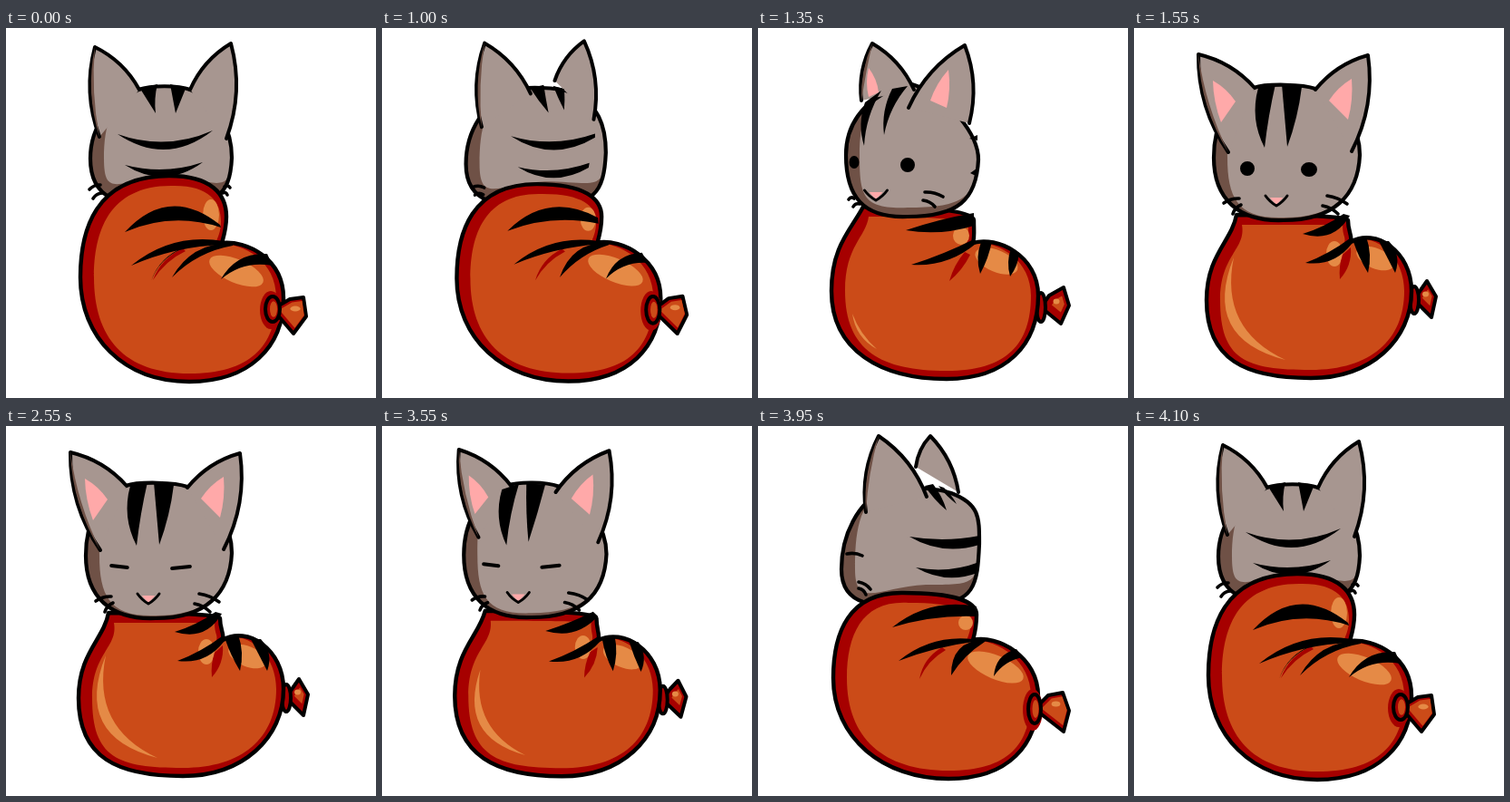
Write an HTML page that moves like this. It is 408 px wide and 408 px high and loops after 4600 ms.

```html
<!DOCTYPE html>
<html lang="en">
<head>
<meta charset="utf-8">
<title>Sausage cat</title>
<style>
html, body { margin: 0; width: 100%; height: 100%; overflow: hidden; background: #fff; }
svg { display: block; width: 100vw; height: 100vh; }
path { stroke-linejoin: round; stroke-linecap: round; }
</style>
</head>
<body>
<svg id="stage" viewBox="0 0 408 408"></svg>
<script>
const RED = '#a60000', ORANGE = '#cb4b18', GLOW = '#e58a46';
const FUR = '#a79690', SHADE = '#6f5146', PINK = '#ffa9a9', INK = '#000';
const LOOP = 4600, STEP = 50;
const stage = document.getElementById('stage');
const parts = [];
let closed = false;

const make = tag => document.createElementNS('http://www.w3.org/2000/svg', tag);
const knot = make('g'), body = make('g'), head = make('g');

// Poses are keyed by turn step: 0 = back view, 12 = front view.
// A part shows only between its first and last key.
function part(parent, shape, fill, line, poses) {
  const el = parent.appendChild(make('path'));
  el.setAttribute('fill', fill);
  if (line) {
    el.setAttribute('stroke', INK);
    el.setAttribute('stroke-width', line);
  }
  parts.push({ el, shape, poses, keys: Object.keys(poses).map(Number) });
}

function pose({ keys, poses }, s) {
  const b = keys.find(k => k >= s);
  if (b === undefined || s < keys[0]) return null;
  if (b === s) return poses[b];
  const a = keys[keys.indexOf(b) - 1], k = (s - a) / (b - a);
  return poses[a].map((v, i) => v + (poses[b][i] - v) * k);
}

// Curve from the current point to (u, v), bowed to the left of travel
function bow(x, y, u, v, k) {
  const dx = u - x, dy = v - y, len = Math.hypot(dx, dy) || 1;
  return `Q${(x + u) / 2 + dy / len * k} ${(y + v) / 2 - dx / len * k} ${u} ${v}`;
}

function oval([x, y, rx, ry], tilt = 0) {
  const a = tilt * Math.PI / 180, dx = rx * Math.cos(a), dy = rx * Math.sin(a);
  const arc = `A${rx} ${ry} ${tilt} 0 1 `;
  return `M${x - dx} ${y - dy}${arc}${x + dx} ${y + dy}${arc}${x - dx} ${y - dy}Z`;
}

// Tip, both ends of the base, bow of both sides
function blade([x, y, ax, ay, bx, by, k, m]) {
  return `M${x} ${y}${bow(x, y, ax, ay, k)}L${bx} ${by}${bow(bx, by, x, y, m)}Z`;
}

function triangle([ax, ay, bx, by, cx, cy]) {
  return `M${ax} ${ay}${bow(ax, ay, bx, by, 4)}${bow(bx, by, cx, cy, 4)}Z`;
}

function ear([ax, ay, x, y, bx, by]) {
  const side = (p, q, u, v) => bow(p, q, u, v, Math.hypot(u - p, v - q) * .16);
  return `M${ax} ${ay}${side(ax, ay, x, y)}${side(x, y, bx, by)}`;
}

function earEdge([ax, ay, x, y]) {
  const k = Math.hypot(x - ax, y - ay) * .16;
  return `M${ax} ${ay}${bow(ax, ay, x, y, k - 3)}${bow(x, y, ax, ay, 9 - k)}Z`;
}

function sausage([lx, ly, cx, cy, tx, ty, rx, ry, nx, ny, j, bx, by, dx, dy]) {
  return `M${lx} ${ly}C${lx} ${ly - 50} ${cx} ${cy} ${tx} ${ty}` +
    `C${tx + (rx - tx) * .74} ${ty} ${rx} ${ry - (ry - ty) * .55} ${rx} ${ry}` +
    `C${rx} ${ry + 13} ${nx + 2} ${ny - 7} ${nx} ${ny}` +
    `C${nx + 27} ${j} ${bx} ${by - 44} ${bx} ${by}` +
    `C${bx} ${by + 54} ${dx + 66} ${dy} ${dx} ${dy}` +
    `C${dx - 72} ${dy} ${lx} ${ly + 66} ${lx} ${ly}Z`;
}

const inset = [15, 0, 16, 9, 6, 11, -6, 5, -7, 1, 2, -8, 0, 0, -9];
const filling = n => sausage(n.map((v, i) => v + inset[i]));

function skull([lx, ly, ax, ay, bx, by, rx, ry, dx, dy]) {
  return `M${ax} ${ay}C${ax + 14} ${ay - 5} ${bx - 13} ${by - 5} ${bx} ${by}` +
    `C${bx + 32} ${by + 12} ${rx} ${ry - 28} ${rx} ${ry}` +
    `C${rx - 2} ${ry + 45} ${dx + 55} ${dy} ${dx} ${dy}` +
    `C${dx - 50} ${dy + 2} ${lx} ${ly + 45} ${lx} ${ly}` +
    `C${lx} ${ly - 38} ${ax - 30} ${ay + 14} ${ax} ${ay}Z`;
}

function coat(n) {
  const m = n.slice();
  m[0] += 15;
  m[9] -= n[10];
  return skull(m);
}

// Knot: ring (x, y, rx, ry), then the outer corners of the tail
const knotPose = {
  0: [294, 310, 8, 14, 313, 299, 328, 297, 331, 318, 317, 337],
  3: [305, 312, 7, 16, 320, 297, 336, 294, 343, 314, 337, 337],
  8: [312, 308, 5, 16, 321, 295, 337, 286, 343, 306, 334, 326],
  12: [309, 300, 5, 15, 316, 289, 323, 279, 333, 296, 328, 319]
};
const tail = ([x, y, , , ...p]) => `M${x} ${y}L${p.join(' ')}Z`;

function tailFace([x, y, rx, , ...p]) {
  const scale = rx > 5.5 ? .74 : .45;
  const at = [(p[0] + p[2] + p[4] + p[6]) / 4, (p[1] + p[3] + p[5] + p[7]) / 4];
  const q = [x, y, ...p].map((v, i) => at[i % 2] + (v - at[i % 2]) * scale);
  return 'M' + q.join(' ') + 'Z';
}

const tailGlow = n => oval([(n[4] + n[8]) / 2 - 3, (n[5] + n[9]) / 2 + 1, n[2] * .7, 3]);
const hole = ([x, y, rx, ry]) => rx > 5.5 ? oval([x + 1, y, rx / 2, ry * .62]) : '';
const puff = ([x, y, rx, ry]) => rx > 5.5 ? oval([x - 2, y + 1, rx + 4, ry + 7]) : '';

part(knot, puff, RED, 0, knotPose);
part(knot, tail, RED, 4, knotPose);
part(knot, tailFace, ORANGE, 0, knotPose);
part(knot, tailGlow, GLOW, 0, knotPose);
part(knot, n => oval(n), RED, 4, knotPose);
part(knot, hole, ORANGE, 0, knotPose);

// Sausage
const bodyPose = {
  0: [82, 275, 97, 163, 180, 163, 243, 208, 238, 237, 234, 306, 298, 202, 390],
  3: [83, 278, 100, 183, 160, 184, 241, 208, 237, 236, 230, 309, 298, 210, 389],
  8: [81, 290, 103, 222, 116, 197, 238, 212, 237, 237, 229, 309, 295, 208, 387],
  12: [80, 300, 108, 235, 113, 206, 236, 212, 239, 236, 220, 306, 290, 195, 386]
};
part(body, sausage, RED, 0, bodyPose);
part(body, filling, ORANGE, 0, bodyPose);
part(body, blade, GLOW, 0, {
  8: [131, 354, 104, 315, 104, 315, 12, -6],
  12: [167, 366, 110, 253, 110, 253, 72, -50]
});
part(body, n => oval(n, 23), GLOW, 0, {
  0: [254, 268, 32, 13], 3: [262, 266, 33, 13], 8: [263, 257, 25, 12], 12: [266, 254, 22, 11]
});
part(body, n => oval(n), GLOW, 0, {
  0: [226, 206, 9, 17], 3: [229, 217, 8, 8], 8: [224, 229, 9, 10], 12: [221, 249, 9, 14]
});
part(body, blade, RED, 0, {
  0: [162, 278, 195, 243, 198, 246, 10, -7],
  3: [178, 279, 203, 244, 207, 247, 10, -7],
  8: [211, 279, 228, 247, 234, 250, 4, 4],
  12: [227, 277, 230, 250, 239, 242, 3, 8]
});
part(body, blade, INK, 0, { 0: [160, 279, 196, 242, 193, 244, 12, -10] });
part(body, blade, INK, 0, {
  0: [131, 225, 236, 217, 237, 220, 49, -20],
  3: [148, 222, 241, 199, 241, 210, 22, -8],
  8: [163, 223, 238, 204, 238, 218, 3, 9],
  12: [186, 227, 231, 205, 238, 207, -4, 22]
});
part(body, blade, INK, 0, {
  0: [138, 262, 240, 235, 240, 239, 24, -10],
  3: [155, 259, 237, 235, 237, 238, 18, -5],
  8: [169, 261, 238, 233, 240, 238, -3, 15],
  12: [189, 259, 238, 232, 240, 238, -4, 16]
});
part(body, blade, INK, 0, {
  0: [183, 275, 250, 237, 250, 240, 23, -12],
  3: [213, 275, 250, 235, 250, 238, 26, -6],
  8: [245, 271, 246, 236, 258, 235, 6, 3],
  12: [258, 270, 242, 236, 256, 230, 2, 6]
});
part(body, blade, INK, 0, {
  0: [237, 277, 288, 249, 294, 262, 18, -14],
  3: [260, 276, 285, 246, 292, 255, 14, -8],
  8: [278, 274, 279, 243, 288, 248, 5, 4],
  12: [288, 270, 270, 235, 281, 235, 0, 11]
});
part(body, sausage, 'none', 4.4, bodyPose);

// Head
const headPose = {
  0: [93, 144, 146, 68, 203, 68, 249, 143, 175, 195, 30],
  3: [92, 158, 140, 70, 213, 74, 244, 130, 185, 197, 22],
  8: [97, 140, 150, 66, 178, 65, 243, 145, 165, 208, 10],
  12: [88, 143, 132, 66, 200, 67, 249, 140, 165, 212, 3]
};
part(head, skull, SHADE, 0, headPose);
part(head, coat, FUR, 0, headPose);
part(head, skull, 'none', 4.2, headPose);

// Ears swap sides as the head turns
const farFront = { 8: [114, 80, 126, 17, 172, 68], 12: [104, 137, 71, 29, 133, 66] };
const nearBack = { 0: [103, 120, 98, 21, 147, 68], 3: [119, 95, 133, 11, 186, 78] };
part(head, ear, FUR, 4, { 0: [203, 68, 248, 17, 243, 122], 3: [174, 45, 190, 11, 221, 73], ...farFront });
part(head, earEdge, SHADE, 0, farFront);
part(head, triangle, PINK, 0, { 8: [122, 76, 122, 44, 133, 71], 12: [96, 104, 87, 58, 112, 81] });
part(head, ear, FUR, 4, { ...nearBack, 8: [166, 88, 228, 19, 233, 105], 12: [200, 68, 258, 30, 240, 136] });
part(head, earEdge, SHADE, 0, nearBack);
part(head, triangle, PINK, 0, {
  6: [172, 82, 176, 46, 176, 86], 8: [190, 80, 210, 46, 208, 88], 12: [215, 80, 240, 56, 236, 101]
});

// Stripes on the back of the head
part(head, blade, INK, 0, {
  0: [123, 117, 228, 113, 228, 113, -21, 38],
  3: [167, 122, 244, 121, 244, 131, -7, 17],
  8: [233, 122, 242, 118, 242, 124, 0, 0]
});
part(head, blade, INK, 0, {
  0: [131, 151, 217, 148, 217, 148, -13, 29],
  3: [174, 156, 244, 150, 242, 162, -10, 16],
  8: [234, 160, 241, 155, 240, 163, 0, 0]
});
part(head, blade, INK, 0, {
  0: [165, 94, 148, 67, 167, 62, 0, -3],
  3: [208, 93, 184, 66, 193, 64, 3, 3],
  6: [218, 84, 200, 66, 206, 68, 2, 2]
});
part(head, blade, INK, 0, {
  0: [187, 94, 181, 62, 198, 67, 0, 0], 3: [219, 86, 199, 66, 205, 68, 2, 2]
});

// Stripes on the forehead
part(head, blade, INK, 0, {
  6: [114, 118, 125, 80, 133, 76, 4, -4],
  8: [117, 130, 118, 82, 136, 69, 8, -8],
  12: [144, 132, 137, 66, 156, 62, 13, -2]
});
part(head, blade, INK, 0, {
  6: [136, 108, 146, 70, 158, 66, 5, -5],
  8: [139, 118, 148, 67, 165, 64, 8, -8],
  12: [169, 131, 163, 62, 185, 65, 0, 4]
});

// Face
const eye = tilt => ([x, y, r, h]) => closed
  ? `M${x - r * 1.1} ${y - tilt}L${x + r * 1.1} ${y + tilt}`
  : oval([x, y, r - 2, h - 2]);
part(head, eye(1), INK, 4, { 7: [102, 148, 4, 6], 8: [106, 148, 5.5, 7], 12: [125, 155, 8, 8] });
part(head, eye(-1), INK, 4, { 5: [122, 148, 4, 7], 8: [165, 151, 8, 8], 12: [193, 156, 9, 8] });

const facePose = { 6: [104, 176, 6], 8: [130, 181, 12.5], 12: [157, 187, 12] };
const nose = ([x, y, w]) => `M${x - w * .6} ${y}H${x + w * .6}L${x} ${y + 8}Z`;
const mouth = ([x, y, w]) =>
  `M${x - w} ${y - 2}Q${x - w * .6} ${y + 5} ${x} ${y + 9}Q${x + w * .6} ${y + 5} ${x + w} ${y - 2}`;
part(head, nose, PINK, 0, facePose);
part(head, mouth, 'none', 3, facePose);

// Whiskers
const hair = ([x, y, u, v]) => `M${x} ${y}${bow(x, y, u, v, 3)}`;
const whisker = poses => part(head, hair, 'none', 3.6, poses);
whisker({ 0: [92, 178, 104, 173], 3: [111, 172, 124, 180], 8: [184, 181, 204, 186], 12: [213, 185, 235, 194] });
whisker({ 0: [96, 188, 106, 182], 3: [111, 179, 119, 186], 8: [182, 190, 195, 197], 12: [208, 196, 225, 205] });
whisker({ 0: [241, 175, 247, 176] });
whisker({ 0: [239, 182, 244, 184] });
whisker({ 3: [98, 141, 115, 143] });
whisker({ 8: [100, 189, 106, 188], 12: [99, 193, 116, 188] });
whisker({ 8: [105, 197, 112, 194], 12: [109, 205, 118, 195] });

function turn(t) {
  if (t < 1000 || t >= 4100) return 0;
  if (t >= 1550 && t < 3550) return 12;
  const s = t < 1550 ? 1 + Math.floor((t - 1000) / STEP) : 11 - Math.floor((t - 3550) / STEP);
  return s < 3 ? s + .3 / s : s;
}

let drawn = '';
function render(t) {
  const s = turn(t);
  closed = t >= 2550;
  const state = s + ' ' + closed;
  if (state === drawn) return;
  drawn = state;
  stage.append(...(s < 6 ? [head, body, knot] : [knot, body, head]));
  for (const p of parts) {
    const n = pose(p, s);
    p.el.setAttribute('d', n ? p.shape(n) : '');
  }
}

const start = performance.now();
function tick() {
  render((performance.now() - start) % LOOP);
  requestAnimationFrame(tick);
}
tick();
</script>
</body>
</html>
```
